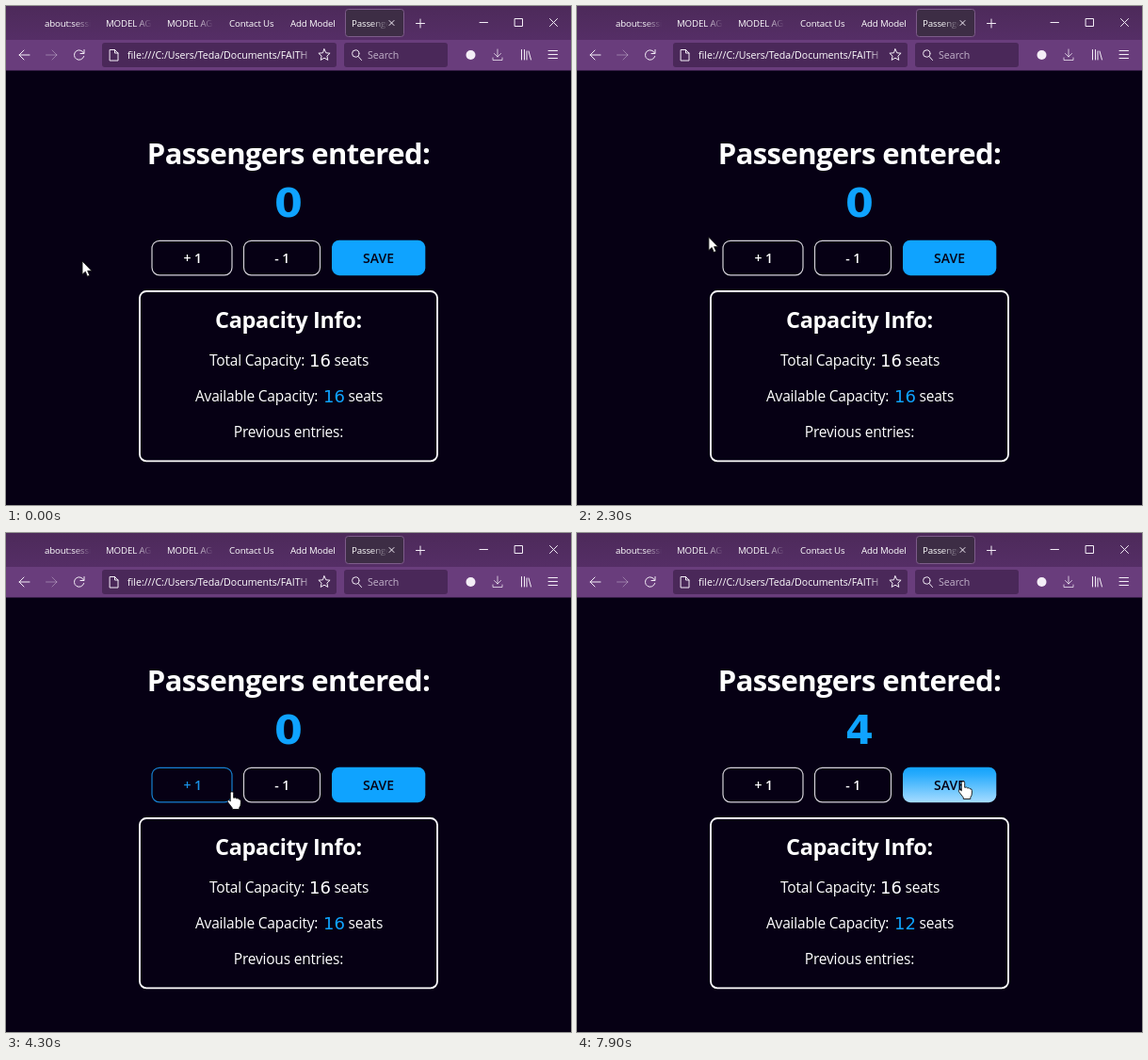
An HTML page for the animation above (8 s loop, 600x530 px).

```html
<!DOCTYPE html>
<html lang="en">
<head>
<meta charset="utf-8">
<title>Passenger counter</title>
<style>
  html, body { margin: 0; width: 100%; height: 100%; overflow: hidden; background: #060014; }
  svg { display: block; width: 600px; height: 530px; font-family: "Open Sans", "Noto Sans", sans-serif; }
  text { fill: #fff; white-space: pre; }
  .tab { font-size: 9.7px; letter-spacing: -.15px; }
  .url { font-size: 10.6px; }
  .mid { text-anchor: middle; }
  .h1 { font-size: 31px; font-weight: 700; letter-spacing: -.6px; }
  .h2 { font-size: 23.5px; font-weight: 700; letter-spacing: -.35px; }
  .p { font-size: 15.5px; letter-spacing: -.2px; }
  .num { font-family: "DejaVu Sans", sans-serif; font-size: 18px; }
  .big { font-size: 43px; font-weight: 700; }
  .blue { fill: #0fa3ff; }
  .btn rect { fill: none; stroke: #d4d2d8; stroke-width: 1.2; }
  .btn text { font-size: 14px; font-weight: 600; text-anchor: middle; }
  .btn.on rect { stroke: #1680d0; }
  .btn.on text { fill: #1a90e6; }
  #save rect { fill: #0fa3ff; stroke: none; }
  #save text { fill: #060014; }
  #save.on rect { fill: url(#glow); }
  .icon { fill: none; stroke: #f4eef7; stroke-width: 1; stroke-linecap: round; stroke-linejoin: round; }
  #pointer path { fill: #fff; stroke: #111; stroke-width: .9; }
</style>
</head>
<body>
<svg viewBox="0 0 600 530">
  <defs>
    <linearGradient id="glow" x2="0" y2="1">
      <stop stop-color="#12a2fb"/><stop offset=".2" stop-color="#27abfd"/><stop offset="1" stop-color="#a6dcff"/>
    </linearGradient>
    <linearGradient id="strip" x2="0" y2="1">
      <stop stop-color="#4d2a5a"/><stop offset="1" stop-color="#552e66"/>
    </linearGradient>
  </defs>

  <rect width="600" height="530" fill="#060014"/>
  <rect width="600" height="36" fill="url(#strip)"/>
  <rect y="36" width="600" height="32.5" fill="#693d7c"/>
  <rect x="360.5" y="3.5" width="62" height="29" rx="3" fill="#3d2d45" stroke="#7d5c8a"/>
  <rect x="102" y="39" width="249" height="26" rx="3" fill="#4a2859"/>
  <rect x="359" y="39" width="110" height="26" rx="3" fill="#4a2859"/>
  <g id="tabs"></g>
  <text class="url" x="384" y="56" style="fill:#c3b3cb">Search</text>

  <g class="icon">
    <path d="M407 15.500l5 5m0-5l-5 5M435.500 18.500h9m-4.500-4.500v9"/>
    <path d="M503 17.500h8.500M540.500 13.500h8v8h-8zM577.500 13.500l8 8m0-8l-8 8"/>
    <path d="M25 52H14m5-5l-5 5 5 5"/>
    <path d="M42.500 52H54m-5-5l5 5-5 5" opacity=".35"/>
    <path d="M82.500 50a5.200 5.200 0 1 0 .2 3.500M83 46.500v4h-4"/>
    <path d="M110.500 46.500h5l3.500 3.500v8h-8.500zM115.500 46.500v3.500h3.500"/>
    <path d="M338 45.800l1.800 4 4.300.4-3.200 2.900.9 4.300-3.800-2.200-3.800 2.200.9-4.300-3.200-2.900 4.300-.4z"/>
    <path d="M375 50.500a3.700 3.700 0 1 0-7.400 0a3.700 3.700 0 1 0 7.400 0M374 53.500l3.500 4"/>
    <path d="M522 46v8m-3.500-3.500l3.500 3.500 3.500-3.500M517 55v2.500h10v-2.500" opacity=".75"/>
    <path d="M547.500 46.500v10.500M550.500 46.500v10.500M553 48v9M555 48l2.500 9"/>
    <path d="M576 47.500h9.500M576 51.500h9.500M576 55.500h9.500"/>
  </g>
  <circle cx="493.500" cy="52" r="5" fill="#f4eef7"/>

  <text class="mid h1" x="300" y="168">Passengers entered:</text>
  <text class="mid num big blue" id="count" x="300" y="223.500">0</text>

  <g class="btn" id="plus"><rect x="155" y="249.300" width="85" height="36.500" rx="8"/><text x="198.300" y="273">+ 1</text></g>
  <g class="btn" id="minus"><rect x="252.500" y="249.300" width="81" height="36.500" rx="8"/><text x="293.300" y="273">- 1</text></g>
  <g class="btn" id="save"><rect x="346" y="248.700" width="99.300" height="37.500" rx="8"/><text x="395.500" y="273">SAVE</text></g>

  <rect x="142" y="303" width="316" height="180.300" rx="7" fill="none" stroke="#fff" stroke-width="1.800"/>
  <text class="mid h2" x="300" y="342">Capacity Info:</text>
  <text class="p" x="216" y="382">Total Capacity:</text>
  <text class="num" x="322" y="382.500">16</text>
  <text class="p" x="348.500" y="382">seats</text>
  <text class="p" x="201" y="420">Available Capacity:</text>
  <text class="num blue" id="free" x="337" y="420.500">16</text>
  <text class="p" x="363.500" y="420">seats</text>
  <text class="mid p" x="300" y="458">Previous entries:</text>

  <g id="pointer">
    <path id="arrow" d="M0 0V14.200L3.300 11.200L5.400 16.200L7.900 15.200L5.700 10.300H10Z"/>
    <path id="hand" d="M-1.700 1.400a1.700 1.700 0 0 1 3.400 0V6.300q2.300-.8 3 .6q2-.6 2.500.8q2.200-.2 2.200 1.900V12q0 3-1.600 4.800V18.500H.3V17L-4.500 10.700q-.6-1.600.6-2q1.100-.3 2.200 1.200Z"/>
  </g>
</svg>
<script>
const $ = id => document.getElementById(id);

// label, left, right edge of the fade, class, baseline
const labels = [
  ["about:sessionrestore", 41, 90, "tab", 22],
  ["MODEL AGENCY", 106, 155, "tab", 22],
  ["MODEL AGENCY", 171, 220, "tab", 22],
  ["Contact Us", 237, 310, "tab", 22],
  ["Add Model", 302, 375, "tab", 22],
  ["Passengers", 367, 406, "tab", 22],
  ["file:///C:/Users/Teda/Documents/FAITH", 129, 328, "url", 56],
];
$("tabs").innerHTML = labels.map(([label, x, end, cls, y], i) => `
  <linearGradient id="fade${i}" gradientUnits="userSpaceOnUse" x1="${end - 18}" x2="${end}">
    <stop stop-color="#fff"/><stop offset="1" stop-color="#fff" stop-opacity="0"/>
  </linearGradient>
  <text class="${cls}" x="${x}" y="${y}" style="fill:url(#fade${i})">${label}</text>`).join("");

const LOOP = 8000, STEP = 100;
const clicks = [5000, 5700, 6300, 6900];
// time, x, y of the pointer's hot spot
const path = [
  [0, 81, 271], [2000, 81, 271], [3200, 458, 107], [4200, 240, 275],
  [5000, 239, 275], [7100, 239, 275], [7200, 347, 270], [7900, 410, 264],
];
// start, hovered button, hand pointer
const hovers = [[0, "", false], [4200, "plus", true], [7200, "minus", false], [7300, "save", true]];

function pointerAt(t) {
  const i = path.findIndex(k => k[0] > t);
  if (i < 0) return path.at(-1).slice(1);
  const [t0, x0, y0] = path[i - 1], [t1, x1, y1] = path[i];
  const u = (t - t0) / (t1 - t0), e = u * u * (3 - 2 * u);
  return [x0 + (x1 - x0) * e, y0 + (y1 - y0) * e];
}

function draw(now) {
  const t = Math.floor(now % LOOP / STEP) * STEP;
  const count = clicks.filter(c => t >= c).length;
  const [, hovered, hand] = hovers.findLast(h => t >= h[0]);
  $("count").textContent = count;
  $("free").textContent = 16 - count;
  for (const id of ["plus", "minus", "save"]) $(id).classList.toggle("on", id === hovered);
  $("hand").style.display = hand ? "" : "none";
  $("arrow").style.display = hand ? "none" : "";
  $("pointer").setAttribute("transform", `translate(${pointerAt(t)})`);
  requestAnimationFrame(draw);
}
requestAnimationFrame(draw);
</script>
</body>
</html>
```
